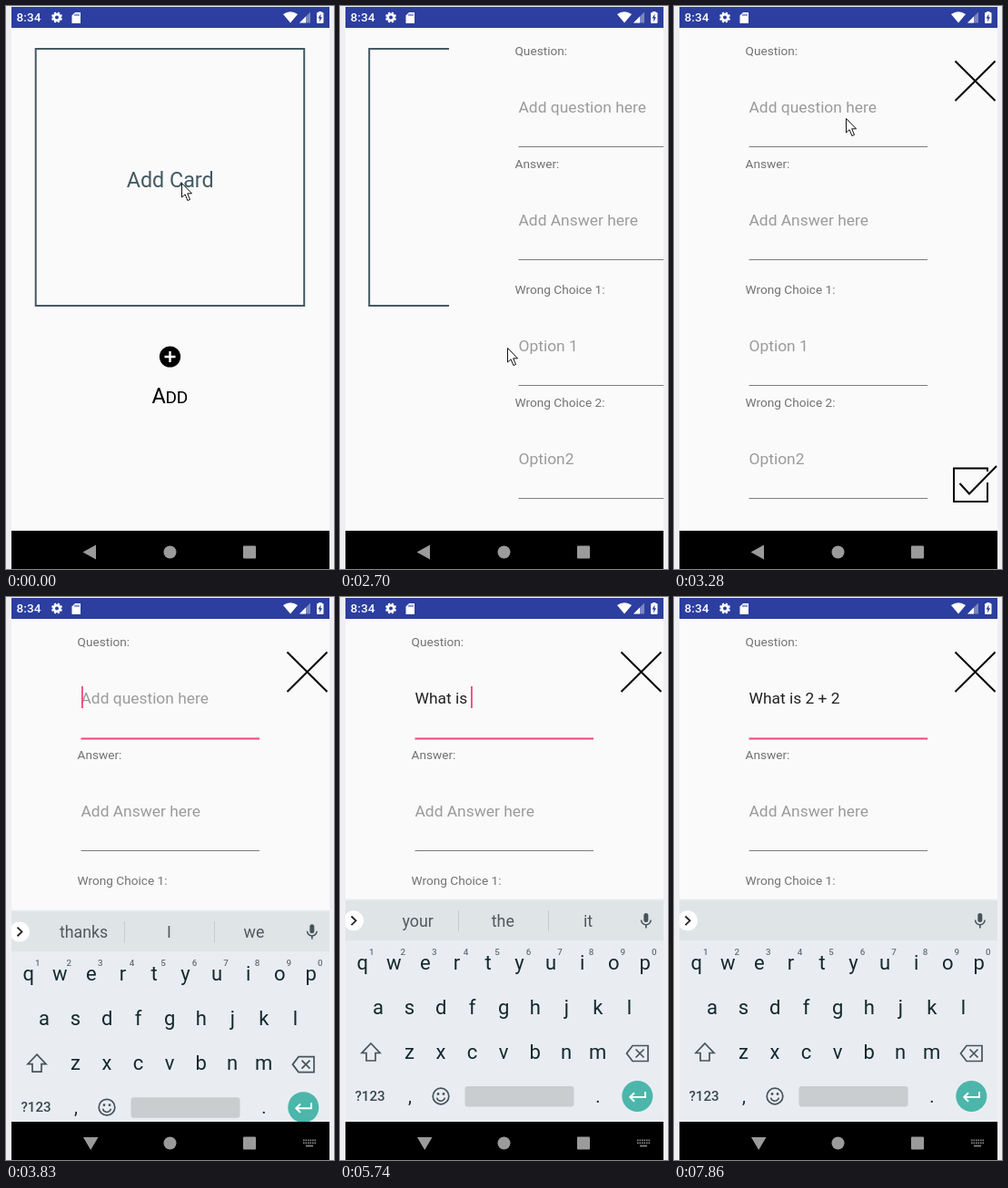
Write an HTML page with a canvas that moves like this. It is 361x618 px and loops after 8000 ms.

```html
<!DOCTYPE html>
<html lang="en">
<head>
<meta charset="utf-8">
<title>Add card screen</title>
<style>
  html, body { margin: 0; width: 100%; height: 100%; overflow: hidden; background: #efeff3; }
  canvas { display: block; width: 361px; height: 618px; }
</style>
</head>
<body>
<canvas id="stage"></canvas>
<script>
const W = 361, H = 618, LOOP = 8000;
const BLUE = '#2c3e9f', PINK = '#f4437f', INK = '#455a64', PAPER = '#fafafa';
const KEY = '#14292f', ICON = '#46545a', NAV = '#9b9b9b';
const PITCH = 34.55; // distance between key centres
const canvas = document.getElementById('stage');
const dpr = window.devicePixelRatio || 1;
canvas.width = W * dpr;
canvas.height = H * dpr;
const c = canvas.getContext('2d');

// ---- helpers ----
const progress = (t, from, to) => Math.min(1, Math.max(0, (t - from) / (to - from)));
const mix = (a, b, k) => a + (b - a) * k;

function text(s, x, y, size, color, align = 'left', weight = 400) {
  c.font = `${weight} ${size}px Roboto, sans-serif`;
  c.fillStyle = color;
  c.textAlign = align;
  c.fillText(s, x, y);
}

function rect(x, y, w, h, color) {
  c.fillStyle = color;
  c.fillRect(x, y, w, h);
}

function shape(path, color) {
  c.fillStyle = color;
  c.fill(new Path2D(path));
}

function line(path, color, width) {
  c.strokeStyle = color;
  c.lineWidth = width;
  c.stroke(new Path2D(path));
}

function disc(x, y, r, color) {
  c.beginPath();
  c.arc(x, y, r, 0, Math.PI * 2);
  c.fillStyle = color;
  c.fill();
}

function arc(x, y, r, color, width, from = 0, to = Math.PI * 2) {
  c.beginPath();
  c.arc(x, y, r, from, to);
  c.strokeStyle = color;
  c.lineWidth = width;
  c.stroke();
}

function pill(x, y, w, h, r, color) {
  c.beginPath();
  c.roundRect(x, y, w, h, r);
  c.fillStyle = color;
  c.fill();
}

function shifted(x, y, part) {
  c.save();
  c.translate(x, y);
  part();
  c.restore();
}

// ---- timing ----
const WIGGLE = 1210, TAP = 2610, FORM_IN = 3270, FOCUS = 3480, KEYS_IN = 3590, KEYS_UP = 3900;
const BLINK = 505;

// Each burst spreads its characters evenly from start to end.
const bursts = [
  { start: 5070, end: 5465, chars: 'What is' },
  { start: 5690, end: 5690, chars: ' ' },
  { start: 6450, end: 6450, chars: '2' },
  { start: 6790, end: 6790, chars: ' ' },
  { start: 7100, end: 7100, chars: '+' },
  { start: 7250, end: 7350, chars: ' 2' }
];

const hints = {
  '': 'thanks I we', W: 'We W Will', Wh: 'What Who Why', Wha: "What What's Whatever",
  What: "What What's Whatever", 'What ': 'is are do', 'What i': 'is I if',
  'What is': 'is isn\u2019t it', 'What is ': 'your the it', 'What is 2 ': 'and the is'
};

function typedAt(t) {
  let typed = '', last = KEYS_IN;
  for (const { start, end, chars } of bursts) {
    [...chars].forEach((ch, i) => {
      const at = mix(start, end, i / Math.max(1, chars.length - 1));
      if (t >= at) {
        typed += ch;
        last = at;
      }
    });
  }
  return { typed, caret: Math.floor(Math.max(0, t - last) / BLINK) % 2 === 0 };
}

function mouseAt(t) {
  if (t < 2000) {
    const a = 1.15 + Math.PI * 2 * progress(t, WIGGLE, 1670);
    return [176 + 41 * Math.cos(a), 180 + 15 * Math.sin(a)];
  }
  if (t < TAP) {
    const k = progress(t, 2000, 2270);
    return [mix(193, 179, k), mix(194, 379, k)];
  }
  const k = progress(t, TAP, 3260);
  return [mix(179, 189, k) + 8.5 * Math.sin(Math.PI * k), mix(379, 123, k ** 2.1)];
}

// ---- screen parts ----
function statusBar() {
  rect(6, 1, 350, 23, BLUE);
  text('8:34', 11.6, 17.3, 13.6, '#fff', 'left', 500);
  for (let i = 0; i < 4; i++) {
    c.save();
    c.translate(56, 12.5);
    c.rotate(i * Math.PI / 4 + Math.PI / 8);
    rect(-6, -1.2, 12, 2.4, '#fff');
    c.restore();
  }
  disc(56, 12.5, 4.6, '#fff');
  disc(56, 12.5, 2, BLUE);
  shape('M76 7H82V19H72.5V10.5Z', '#fff');
  for (let i = 0; i < 3; i++) rect(75.5 + i * 2, 8.5, 1, 2.5, BLUE);
  shape('M313 18.5L305 9Q313 3.4 321 9Z', '#fff');
  shape('M323 18.5H335V6.5Z', '#7a86c2');
  shape('M323 18.5H330V11.5Z', '#fff');
  pill(342, 7, 7.5, 12, 1, '#fff');
  rect(344, 6, 3.5, 1.5, '#fff');
  shape('M346.5 8.5L343.5 13.5H345.3L345 17.5L348 12.3H346.3Z', BLUE);
}

function navBar(open) {
  rect(6, 576, 350, 42, '#000');
  shape(open ? 'M85 593H101.5L93.2 607Z' : 'M84.5 599.5L99 591.5V607.5Z', NAV);
  if (open) {
    for (let i = 0; i < 12; i++) {
      rect(327 + i % 6 * 2.5, 595.5 + Math.floor(i / 6) * 3, 1.6, 1.7, '#858585');
    }
    rect(330, 601.7, 8, 1.7, '#858585');
  }
  disc(180.5, 599.5, 7, NAV);
  pill(261, 592.5, 14, 14, 1, NAV);
}

function cardScreen() {
  c.strokeStyle = INK;
  c.lineWidth = 2;
  c.strokeRect(32.7, 47, 295.5, 282);
  text('Add Card', 180.7, 199.2, 23.3, INK, 'center');
  disc(180.5, 385, 11.6, '#000');
  line('M174.5 385h12m-6 -6v12', '#fff', 2.4);
  text('A', 160.5, 436, 23.5, '#000');
  text('DD', 175.4, 436, 19, '#000');
}

const fields = [
  ['Question:', 'Add question here'],
  ['Answer:', 'Add Answer here'],
  ['Wrong Choice 1:', 'Option 1'],
  ['Wrong Choice 2:', 'Option2']
];

function form(t) {
  const focus = t >= FOCUS, { typed, caret } = typedAt(t);
  rect(6, 24, 350, 552, PAPER);
  fields.forEach(([label, hint], i) => {
    const y = 54 + i * 124 + (i > 1 ? 14 : 0);
    const filled = i === 0 && typed;
    text(label, 78.5, y, 13.65, '#737373');
    text(filled ? typed : hint, 82.5, y + 63, 17.4, filled ? '#212121' : '#9b9b9b');
    if (i === 0 && focus) rect(82.5, y + 100.5, 196.5, 2, PINK);
    else rect(82.5, y + 100, 196.5, 1, '#7c7c7c');
  });
  if (focus && caret) {
    c.font = '400 17.4px Roboto, sans-serif';
    rect(Math.round(82.5 + c.measureText(typed).width), 98, 1.8, 24, PINK);
  }
  line('M309.5 60.5l44 43.5m0 -43.5l-44 43.5', '#000', 2);
  line('M345 511V507.5H308V544H345V523M314.5 524L325 535.5L355 505', '#000', 2);
}

function keyRow(keys, x, y, size = 22, color = KEY, weight = 400) {
  [...keys].forEach((k, i) => text(k, x + i * PITCH, y, size, color, 'center', weight));
}

function suggestions(words) {
  rect(6, 333, 350, 44, '#dfe4e7');
  disc(15, 355.3, 11, '#fff');
  line('M12.5 350.5l5 4.8l-5 4.8', '#222', 1.8);
  words.forEach((w, i) => {
    text(w, 85.6 + i * 93.7, 362, 17.8, '#50595d', 'center');
    if (i) rect(31 + i * 99, 344, 1, 23, '#c6cbce');
  });
  pill(334.3, 347, 5, 10, 2.5, ICON);
  arc(336.8, 354.5, 5.3, ICON, 1.5, 0, Math.PI);
  rect(336, 359.5, 1.6, 4, ICON);
}

function keyboard(t) {
  const words = hints[typedAt(t).typed];
  rect(6, 331.5, 350, 244.5, '#e9edf1');
  suggestions(words ? words.split(' ') : []);
  keyRow('qwertyuiop', 24.8, 409);
  keyRow('asdfghjkl', 42, 458);
  keyRow('zxcvbnm', 76.4, 507);
  keyRow('1234567890', 34.8, 392.7, 9.8, '#667176', 500);

  line('M34 490l10 10.5h-5v8.5h-10v-8.5h-5Z', ICON, 1.7);
  line('M315.5 501l6.5 -8.5h17v17h-17Z', ICON, 1.7);
  line('M325.5 496.5l9 9m0 -9l-9 9', ICON, 1.7);

  text('?123', 33, 553, 15.1, '#37474f', 'center', 500);
  text(',', 77, 555, 20, KEY, 'center');
  text('.', 284, 555, 20, KEY, 'center');
  arc(111, 548, 8.8, ICON, 1.7);
  disc(108, 545.5, 1.4, ICON);
  disc(114, 545.5, 1.4, ICON);
  arc(111, 548.7, 4.5, ICON, 1.6, 0.2, Math.PI - 0.2);
  pill(137.5, 537, 120, 22.5, 3, '#c9cdd0');
  disc(327.3, 548, 17, '#4cb6ab');
  line('M336 543v6h-16.5m4.5 -4.7l-4.7 4.7l4.7 4.7', '#fff', 2);
}

function pointer() {
  const arrow = 'M0 0V15.5L3.6 12.3L6.4 19L9 18L6.2 11.3H11Z';
  shape(arrow, '#fff');
  line(arrow, '#111', 1);
}

function screen(t) {
  if (t < FORM_IN) shifted(-0.5375 * Math.max(0, t - 2700), 0, cardScreen);
  if (t >= TAP) {
    const left = 1 - progress(t, TAP, FORM_IN);
    shifted(142.4 * left ** 1.5, 0, () => form(t));
  }
  if (t >= KEYS_IN) {
    const left = 1 - progress(t, KEYS_IN, KEYS_UP);
    shifted(0, 245 * left ** 2, () => keyboard(t));
  }
}

function draw(t) {
  c.setTransform(dpr, 0, 0, dpr, 0, 0);
  rect(0, 0, W, H, '#efeff3');
  rect(6, 1, 350, 617, PAPER);
  c.save();
  c.beginPath();
  c.rect(6, 24, 350, 552);
  c.clip();
  screen(t);
  c.restore();
  statusBar();
  navBar(t >= KEYS_IN);
  if (t < 30 || (t >= WIGGLE && t < FOCUS)) {
    const [x, y] = mouseAt(t).map(Math.round);
    shifted(x + 0.5, y + 0.5, pointer);
  }
}

const start = performance.now();
function tick() {
  draw((performance.now() - start) % LOOP);
  requestAnimationFrame(tick);
}
tick();
</script>
</body>
</html>
```
